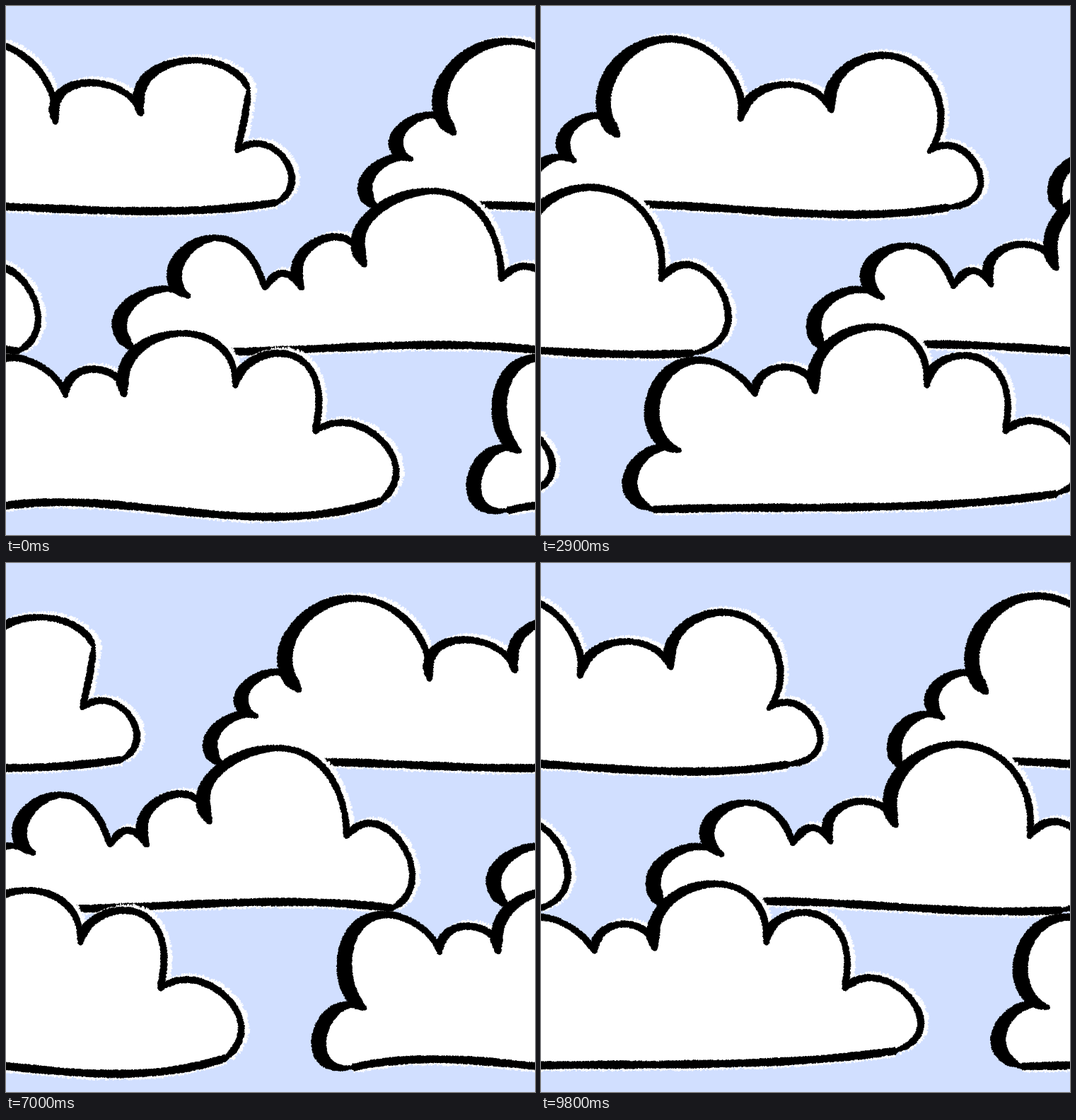
These frames come from a looping animation (748 by 748 pixels, 9900 ms). An HTML page with a canvas:

```html
<!DOCTYPE html>
<html lang="en">
<head>
<meta charset="utf-8">
<title>Drifting clouds</title>
<style>
  html, body { margin: 0; width: 100%; height: 100%; overflow: hidden; background: #d1dfff; }
  canvas { display: block; width: 748px; height: 748px; }
</style>
</head>
<body>
<canvas id="stage" width="748" height="748"></canvas>
<script>
const SIZE = 748, STEP_MS = 100, STEPS = 99, HOLD = 5;
const SKY = '#d1dfff', PAPER = '#fff', INK = '#000';

let seed = 1;
const random = () => (seed = (seed * 16807) % 2147483647) / 2147483647;

// Smooth polynomial through a flat x,y list, parametrised by chord length
function curve(flat) {
  const knots = [], at = [0];
  for (let i = 0; i < flat.length; i += 2) knots.push([flat[i], flat[i + 1]]);
  for (let i = 1; i < knots.length; i++) {
    at.push(at[i - 1] + Math.hypot(knots[i][0] - knots[i - 1][0], knots[i][1] - knots[i - 1][1]));
  }
  const total = at.at(-1), n = Math.ceil(total / 0.8);
  return Array.from({ length: n + 1 }, (_, s) => {
    const t = total * s / n;
    let x = 0, y = 0;
    knots.forEach((knot, i) => {
      const weight = at.reduce((w, a, j) => j === i ? w : w * (t - a) / (at[i] - a), 1);
      x += weight * knot[0];
      y += weight * knot[1];
    });
    return [x, y];
  });
}

// Grainy brush: upward parts swell by `bold`, tips can taper
function brush(ctx, pts, color, { base, bold = 0, rough = 0.9, taper = false }) {
  ctx.strokeStyle = ctx.fillStyle = color;
  ctx.lineWidth = 1.7;
  const last = pts.length - 1, phase = random() * 6;
  pts.forEach(([x, y], i) => {
    const a = pts[Math.max(0, i - 4)], b = pts[Math.min(last, i + 4)];
    const length = Math.hypot(b[0] - a[0], b[1] - a[1]) || 1;
    const tx = (b[0] - a[0]) / length, ty = (b[1] - a[1]) / length;
    let width = base + bold * Math.max(0, -ty) ** 1.2 + 0.6 * Math.sin(i / 23 + phase);
    if (taper) width *= Math.min(1, 0.5 + i / 36, 0.6 + (last - i) / 32);
    const reach = () => width / 2 + (random() - 0.5) * 2 * rough;
    const left = reach(), right = reach();
    ctx.beginPath();
    ctx.moveTo(x + ty * left, y - tx * left);
    ctx.lineTo(x - ty * right, y + tx * right);
    ctx.stroke();
    ctx.beginPath();
    ctx.arc(x, y, Math.max(1, width / 2 - rough), 0, 7);
    ctx.fill();
  });
}

// Taller lobes get a heavier rising side, the two leftmost the heaviest
function boldness(pts, index) {
  const rise = pts[0][1] - Math.min(...pts.map(p => p[1]));
  return Math.min(12, 2 + rise / 13 + (index < 2 ? 4 : 0));
}

// Each lobe starts where the previous one ended; the last is the base line.
function cloud(ctx, dx, ...lobes) {
  const strokes = lobes.map((lobe, i) => curve([...lobes.at(i - 1).slice(-2), ...lobe]));
  const isBase = i => i === strokes.length - 1;
  for (let copy = -1; copy < 3; copy++) {
    seed = 4711;
    ctx.save();
    ctx.translate(copy * SIZE - dx, 0);
    strokes.forEach((pts, i) => {
      if (i < 2) return;
      const [sx, sy] = isBase(i) ? [0, 2] : [5, -2];
      brush(ctx, pts.map(([x, y]) => [x + sx, y + sy]), PAPER, { base: 11, rough: 2.4 });
    });
    ctx.fillStyle = PAPER;
    ctx.beginPath();
    strokes.flat().forEach(p => ctx.lineTo(p[0], p[1]));
    ctx.fill();
    strokes.forEach((pts, i) => brush(ctx, pts, INK, isBase(i)
      ? { base: 10.5 }
      : { base: 9, bold: boldness(pts, i), taper: true }));
    ctx.restore();
  }
}

function drawSkyOne(ctx) {
  cloud(ctx, 408,
    [168, 252, 192, 222, 234, 217],
    [211, 192, 240, 159, 294, 180],
    [274, 125, 337, 56, 448, 84, 478, 165],
    [488, 121, 548, 111, 599, 153],
    [603, 107, 680, 77, 751, 118],
    [744, 165, 734, 206],
    [788, 203, 812, 242, 790, 278],
    [600, 290, 440, 285, 184, 285]);
  cloud(ctx, 612,
    [26, 440, 65, 405, 123, 411],
    [103, 372, 162, 328, 208, 353, 230, 400],
    [253, 378, 283, 399],
    [279, 358, 322, 327, 371, 366],
    [366, 315, 425, 269, 505, 270, 552, 322, 564, 388],
    [600, 368, 652, 415, 629, 488],
    [420, 480, 270, 486, 46, 486]);
  cloud(ctx, 75.6,
    [-10, 690, 2, 642, 55, 630],
    [25, 570, 60, 502, 122, 508, 160, 552],
    [175, 520, 225, 520, 243, 550],
    [256, 491, 345, 465, 400, 538],
    [422, 503, 492, 500, 518, 560, 512, 603],
    [575, 594, 626, 648, 605, 700],
    [330, 715, 130, 702, 38, 713]);
}

function drawSkyTwo(ctx) {
  const dx = 219.1;
  cloud(ctx, dx,
    [-19, 248, 5, 220, 48, 219],
    [31, 192, 65, 157, 109, 183],
    [89, 125, 148, 53, 240, 66, 282, 161],
    [300, 127, 370, 114, 411, 148],
    [418, 103, 490, 70, 550, 105, 548, 207],
    [588, 200, 621, 240, 575, 285],
    [480, 294, 300, 289, -12, 288]);
  cloud(ctx, dx,
    [389, 437, 430, 404, 484, 413],
    [465, 368, 518, 339, 560, 356, 583, 398],
    [610, 374, 637, 395],
    [640, 354, 684, 337, 729, 371],
    [724, 318, 772, 267, 858, 265, 908, 315, 917, 388],
    [958, 366, 1010, 420, 962, 491],
    [820, 491, 640, 481, 402, 486]);
  cloud(ctx, dx,
    [126, 668, 148, 634, 197, 629],
    [158, 560, 200, 505, 262, 511, 303, 550],
    [320, 517, 368, 516, 388, 545],
    [402, 484, 480, 454, 546, 538],
    [566, 503, 630, 503, 660, 560, 656, 603],
    [715, 591, 764, 648, 728, 690],
    [480, 708, 250, 710, 160, 712]);
}

const skies = [drawSkyOne, drawSkyTwo].map(draw => {
  const tile = document.createElement('canvas');
  tile.width = tile.height = SIZE;
  draw(tile.getContext('2d'));
  return tile;
});

const stage = document.getElementById('stage').getContext('2d');
const start = performance.now();

function render(now) {
  const step = Math.floor(Math.max(0, now - start) / STEP_MS) % STEPS;
  const sky = skies[Math.floor(step / HOLD) % 2];
  const x = Math.round(step * SIZE / STEPS);
  stage.fillStyle = SKY;
  stage.fillRect(0, 0, SIZE, SIZE);
  stage.drawImage(sky, x, 0);
  stage.drawImage(sky, x - SIZE, 0);
  requestAnimationFrame(render);
}
render(start);
</script>
</body>
</html>
```
